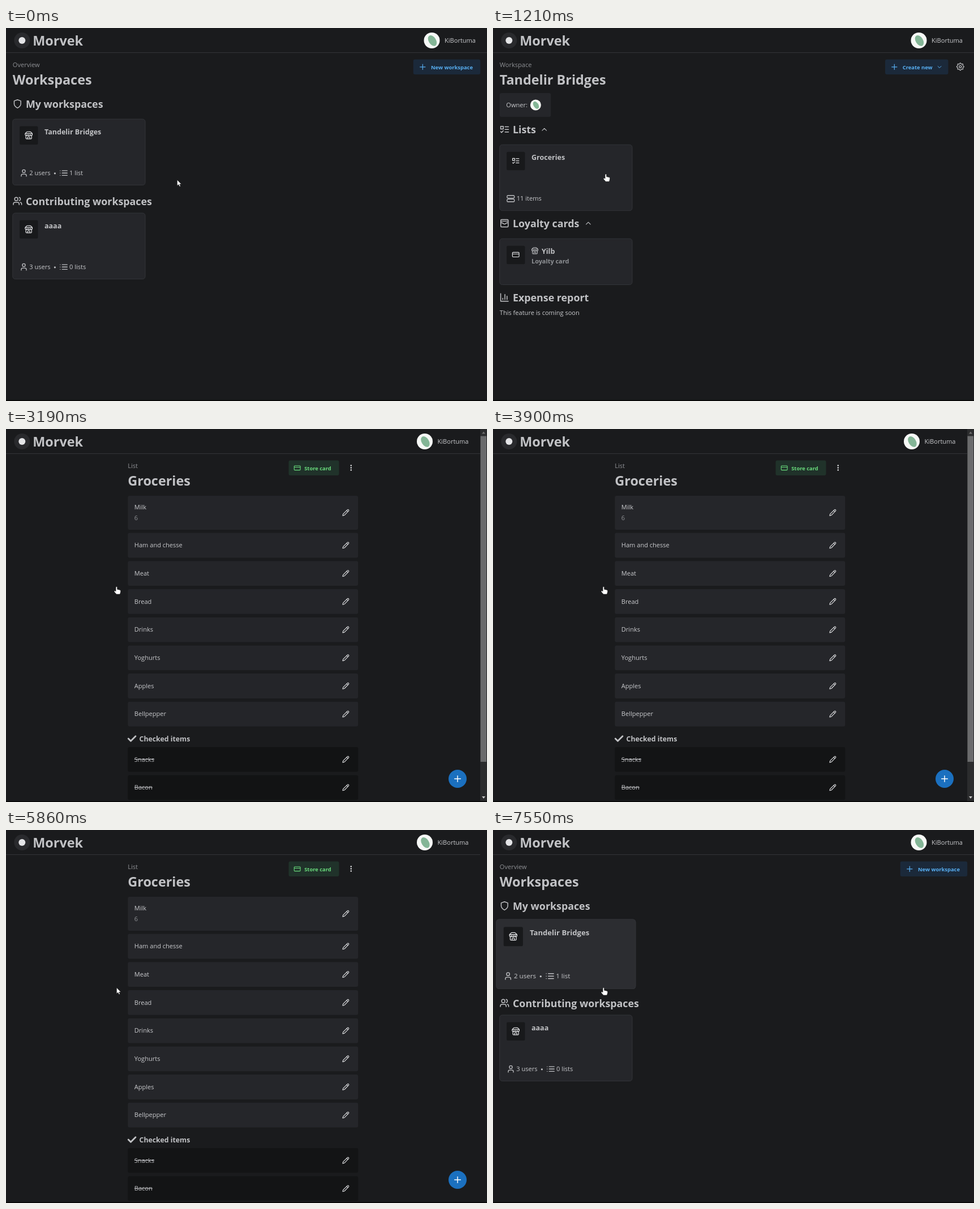
These frames come from a looping animation (850 by 659 pixels, 8 s). An HTML page:

```html
<!DOCTYPE html>
<html lang="en">
<head>
<meta charset="utf-8">
<title>Workspaces</title>
<style>
html, body { margin: 0; width: 100%; height: 100%; overflow: hidden; background: #1a1b1d; }
svg { display: block; width: 100vw; height: 100vh; }
text { font-family: "Open Sans", "Noto Sans", sans-serif; white-space: pre; }
</style>
</head>
<body>
<svg id="stage" viewBox="0 0 850 659" xmlns="http://www.w3.org/2000/svg"></svg>
<script>
const LOOP = 8000, FADE = 250;
const BG = '#1a1b1d', CARD = '#25262a', LIGHT = '#c1c2c5', BRIGHT = '#c9cacd', DIM = '#8f9195', WHITE = '#e4e5e7', BLUE = '#58b0f4', GREEN = '#69db7c';
const BODY = 11.06, HEAD = 17.84, TITLE = 23.4, SMALL = 12.5;

function gearPath() {
  let d = '';
  for (let i = 0; i < 96; i++) {
    const a = i / 96 * 2 * Math.PI, r = 8.4 + 1.2 * Math.tanh(2 * Math.cos(8 * a));
    d += (i ? 'L' : 'M') + (12 + r * Math.cos(a)).toFixed(2) + ' ' + (12 + r * Math.sin(a)).toFixed(2);
  }
  return d + 'ZM9 12a3 3 0 1 0 6 0a3 3 0 1 0-6 0';
}

const ICONS = {
  shield: 'M12 22s8-4 8-10V5l-8-3l-8 3v7c0 6 8 10 8 10',
  users: 'M5 7a4 4 0 1 0 8 0a4 4 0 1 0-8 0M2 21v-2a4 4 0 0 1 4-4h6a4 4 0 0 1 4 4v2M16 3.1a4 4 0 0 1 0 7.8M22 21v-2a4 4 0 0 0-3-3.9',
  user: 'M8 7a4 4 0 1 0 8 0a4 4 0 0 0-8 0M5 21v-2a4 4 0 0 1 4-4h6a4 4 0 0 1 4 4v2',
  list: 'M8 6h13M8 12h13M8 18h13M3 6v.01M3 12v.01M3 18v.01',
  store: 'M2 7l4.4-4.4a2 2 0 0 1 1.4-.6h8.4a2 2 0 0 1 1.4.6L22 7M4 12v8a2 2 0 0 0 2 2h12a2 2 0 0 0 2-2v-8M9 22v-4a2 2 0 0 1 2-2h2a2 2 0 0 1 2 2v4M2 7h20v3a2.5 2.5 0 0 1-5 0a2.5 2.5 0 0 1-5 0a2.5 2.5 0 0 1-5 0a2.5 2.5 0 0 1-5 0z',
  tasks: 'M3 5h6v6h-6zM3 17l2 2l4-4M13 6h8M13 12h8M13 18h8',
  stack: 'M2 6a2.5 2.5 0 0 1 2.5-2.5h15a2.5 2.5 0 0 1 2.5 2.5v2a2.5 2.5 0 0 1-2.5 2.5h-15a2.5 2.5 0 0 1-2.5-2.5zM2 16a2.5 2.5 0 0 1 2.5-2.5h15a2.5 2.5 0 0 1 2.5 2.5v2a2.5 2.5 0 0 1-2.5 2.5h-15a2.5 2.5 0 0 1-2.5-2.5z',
  wallet: 'M3 5a2 2 0 0 1 2-2h14a2 2 0 0 1 2 2v14a2 2 0 0 1-2 2h-14a2 2 0 0 1-2-2zM3 9a2 2 0 0 1 2-2h14a2 2 0 0 1 2 2M3 11h3c.8 0 1.6.3 2.1.9l1.1.9c1.6 1.6 4.1 1.6 5.7 0l1.1-.9c.5-.5 1.3-.9 2.1-.9h2.9',
  card: 'M2 7a2 2 0 0 1 2-2h16a2 2 0 0 1 2 2v10a2 2 0 0 1-2 2h-16a2 2 0 0 1-2-2zM2 10h20',
  chart: 'M3 3v18h18M8 17v-3M13 17v-12M18 17v-8',
  gear: gearPath(),
  pencil: 'M17 3a2.84 2.84 0 1 1 4 4L7.5 20.5L2 22l1.5-5.5zM15 5l4 4',
  plus: 'M12 4v16M4 12h16',
  up: 'M5 15l7-7l7 7',
  down: 'M5 9l7 7l7-7',
  check: 'M3 12l6 6l12-12'
};

const icon = (name, x, y, size, color = LIGHT, w = 2) =>
  `<path d="${ICONS[name]}" transform="translate(${x - size / 2} ${y - size / 2}) scale(${size / 24})" fill="none" stroke="${color}" stroke-width="${w}" stroke-linecap="round" stroke-linejoin="round"/>`;
const text = (x, y, str, size = BODY, color = BRIGHT, weight = 400, extra = '') =>
  `<text x="${x}" y="${y}" font-size="${size}" font-weight="${weight}" fill="${color}" ${extra}>${str}</text>`;
const bold = (x, y, str, size, color = LIGHT) => text(x, y, str, size, color, 700);
const rect = (x, y, w, h, fill, r = 0, extra = '') =>
  `<rect x="${x}" y="${y}" width="${w}" height="${h}" rx="${r}" fill="${fill}" ${extra}/>`;
const circle = (x, y, r, fill) => `<circle cx="${x}" cy="${y}" r="${r}" fill="${fill}"/>`;
const group = (id, inner) => `<g id="${id}">${inner}</g>`;

// Text that morphs between pages; base is the baseline's distance from the top of its box.
const boxes = {};
function shared(id, str, x, y, w, base, size, color = LIGHT, weight = 700) {
  boxes[id] = { x, y, w };
  return group(id, text(0, base, str, size, color, weight));
}
const eyebrow = (id, str, x, w) => shared(id, str, x, 56, w, 12.6, BODY, DIM, 400);
const title = (id, str, x, w) => shared(id, str, x, 75.8, w, 24.2, TITLE);
const heading = (id, str, y, w) => shared(id, str, 35, y - 18, w, 18, HEAD);
const cardTitle = (id, str, y, w) => shared(id, str, 68, y - 14, w, 14, SMALL);

const avatar = (x, y, r) => circle(x, y, r, '#f6f8f6') +
  `<ellipse cx="${x + r * .04}" cy="${y + r * .06}" rx="${r * .46}" ry="${r * .74}" transform="rotate(-32 ${x} ${y})" fill="#83b596"/>`;

const userBadge = x => avatar(x, 22, 14) + text(x + 22.5, 25.5, 'KiBortuma');

function card(id, y, h, inner) {
  const frame = (fill, line, extra = '') => rect(11.8, y, 234.2, h, fill, 4.5, `stroke="${line}" stroke-width="1" ${extra}`);
  return group(id, frame(CARD, '#323438') +
    frame('#2c2d31', '#313236', 'class="glow" opacity="0"') +
    rect(24, y + 12.5, 32.5, 32.5, '#18191b', 2.5) + inner);
}
const badge = (name, y, size) => icon(name, 40.2, y, size, WHITE);

const counts = (y, users, lists) => icon('user', 31.5, y - 3.8, 15.5) + text(41.3, y, users) +
  circle(86.4, y - 3.2, 1.6, LIGHT) + icon('list', 102, y - 3.7, 16.5) + text(112, y, lists);

const button = (x, w, fill, label, tx, color) => rect(x, 55.5, w, 26.5, fill, 3) + bold(tx, 72.5, label, 9.4, color);

function overviewPage() {
  return eyebrow('overLabel', 'Overview', 11.8, 139) + title('overTitle', 'Workspaces', 11.8, 139) +
    button(719.7, 118.5, '#1b293a', 'New workspace', 751, BLUE) + icon('plus', 736.3, 68.8, 14, BLUE) +
    icon('shield', 20.3, 134, 17.5) + heading('overHead', 'My workspaces', 141, 137) +
    card('overCard', 161, 116.5, badge('store', 189.5, 15) + counts(260, '2 users', '1 list')) +
    cardTitle('overName', 'Tandelir Bridges', 187.5, 102) +
    icon('users', 20.3, 305.8, 17.5) + bold(35, 312.6, 'Contributing workspaces', HEAD) +
    card('otherCard', 327, 116.5, badge('store', 355.5, 15) + counts(426, '3 users', '0 lists') +
      bold(68, 353.6, 'aaaa', SMALL));
}

function workPage() {
  return eyebrow('workLabel', 'Workspace', 11.8, 193) + title('workTitle', 'Tandelir Bridges', 11.8, 193) +
    button(693, 111.5, '#1b293a', 'Create new', 723.7, BLUE) + icon('plus', 709.3, 68.8, 14, BLUE) +
    icon('down', 789, 68.8, 10, BLUE, 2.4) + icon('gear', 825.8, 68.3, 16, LIGHT, 1.8) +
    rect(11.8, 115, 90.5, 42, CARD, 3) + text(23.3, 140.2, 'Owner:') + avatar(75.4, 136, 9.5) +
    icon('tasks', 20.5, 179.2, 18.5) + heading('workHead', 'Lists', 186.3, 40) + icon('up', 90.7, 179.6, 13) +
    card('workCard', 206.2, 116.5, badge('tasks', 234.7, 15) + icon('stack', 31.3, 301.5, 15.5) +
      text(41.8, 305.2, '11 items')) +
    cardTitle('workName', 'Groceries', 232.6, 59) +
    icon('wallet', 20.3, 345, 17.5) + bold(35, 352.2, 'Loyalty cards', HEAD) + icon('up', 168.4, 345.3, 13) +
    card('loyalty', 372.2, 81.3, badge('card', 400.4, 14) + icon('store', 74, 393.5, 13) +
      bold(86, 398.6, 'Yilb', SMALL) + bold(68, 416.2, 'Loyalty card', 10.9, DIM)) +
    icon('chart', 20.3, 476, 18) + bold(35, 483.2, 'Expense report', HEAD) +
    text(11.8, 507.2, 'This feature is coming soon');
}

function listPage() {
  const pencil = y => icon('pencil', 600.4, y, 13, WHITE);
  const names = ['Ham and chesse', 'Meat', 'Bread', 'Drinks', 'Yoghurts', 'Apples', 'Bellpepper'];
  let rows = rect(215.3, 118, 407, 60, CARD, 3) + text(226.8, 142.4, 'Milk') +
    text(226.8, 160.5, '6', BODY, DIM) + pencil(147.7);
  names.forEach((name, i) => {
    const y = 183.6 + 49.7 * i;
    rows += rect(215.3, y, 407, 43.8, CARD, 3) + text(226.8, y + 25.5, name) + pencil(y + 21.8);
  });
  rows += icon('check', 222.6, 547, 17, LIGHT, 4) + bold(235.6, 551.6, 'Checked items', 12.3);
  ['Snacks', 'Bacon'].forEach((name, i) => {
    const y = 562 + 49.7 * i;
    rows += rect(215.3, y, 407, 43.6, '#131415', 3) +
      text(226.8, y + 25.5, name, BODY, '#b9babd', 400, 'text-decoration="line-through"') + pencil(y + 21.7);
  });
  return eyebrow('listLabel', 'List', 215.3, 110) + title('listTitle', 'Groceries', 215.3, 110) +
    button(499.5, 89, '#20322a', 'Store card', 527.2, GREEN) + icon('card', 514.7, 68.8, 13, GREEN) +
    [64.4, 68.4, 72.4].map(y => circle(609.8, y, 1.25, WHITE)).join('') +
    group('rows', rows) + circle(798, 618, 16, '#1b70bf') + icon('plus', 798, 618, 16, '#fff', 2.2);
}

const scrollbar = rect(838, 0, 12, 658, '#2b2c2d') + rect(838.5, 12.5, 10.5, 575.5, '#6a6b6c') +
  '<path d="M841 8.5l3-4l3 4z" fill="#6d6d6d"/><path d="M841 649l3 4l3-4z" fill="#c8c8c8"/>';
const hand = '<path d="M-1.4 1.3a1.35 1.35 0 0 1 2.7 0V4.6L5.8 5.6Q7.6 6.1 7.4 7.9L6.8 11.2L5.9 13.4H-.3L-4.2 8.9Q-4.7 7.2-3.1 6.9L-1.4 8.1Z" fill="#fff" stroke="#111" stroke-width=".7"/>';
const arrow = '<path d="M0 0V10.6L2.5 8.4L4.3 12L6.1 11.2L4.4 7.7H7.7Z" fill="#fff" stroke="#111" stroke-width=".6"/>';

document.getElementById('stage').innerHTML =
  rect(0, 0, 850, 659, BG) + rect(0, 43, 850, 1, '#333539') +
  circle(28.3, 22, 14, '#292a2d') + circle(28.3, 22, 6, WHITE) + bold(47.3, 31, 'Morvek', TITLE) +
  group('wideUser', userBadge(752.5)) +
  group('slimUser', rect(838, 0, 12, 657, BG) + userBadge(740)) +
  group('over', overviewPage()) + group('work', workPage()) + group('list', listPage()) +
  group('scroll', scrollbar) + rect(0, 657.4, 850, 1.6, '#060606') +
  group('cursor', group('hand', hand) + group('arrow', arrow));

const el = {};
document.querySelectorAll('[id]').forEach(e => el[e.id] = e);

const clamp = x => Math.min(1, Math.max(0, x));
const mix = (a, b, p) => a + (b - a) * p;
const bezier = (a, b, u) => 3 * u * (1 - u) * (1 - u) * a + 3 * u * u * (1 - u) * b + u * u * u;
function ease(x) {
  if (x <= 0 || x >= 1) return clamp(x);
  let lo = 0, hi = 1;
  for (let i = 0; i < 24; i++) {
    const m = (lo + hi) / 2;
    if (bezier(.25, .25, m) < x) lo = m; else hi = m;
  }
  return bezier(.1, 1, lo);
}
const ramp = (t, from, to) => ease((t - from) / (to - from));
const fade = (id, v) => el[id].setAttribute('opacity', v);
const show = (id, on) => el[id].setAttribute('visibility', on ? 'visible' : 'hidden');

const visits = [[0, 'over'], [885, 'work'], [2510, 'list'], [5935, 'work'], [7080, 'over']];
const links = [
  ['over', 'work', [['overName', 'workTitle'], ['overHead', 'workLabel']]],
  ['work', 'list', [['workName', 'listTitle'], ['workHead', 'listLabel']]]
];

function place(id, box) {
  el[id].setAttribute('transform', `translate(${box.x} ${box.y}) scale(${box.w / boxes[id].w})`);
}

// Grows a card around its centre and returns the box of its title.
function hover(cardId, nameId, cy, h) {
  const cx = 129, s = 1 + .05 * h, b = boxes[nameId];
  el[cardId].setAttribute('transform', `translate(${cx} ${cy}) scale(${s}) translate(${-cx} ${-cy})`);
  el[cardId].querySelector('.glow').setAttribute('opacity', h);
  return { x: cx + (b.x - cx) * s, y: cy + (b.y - cy) * s, w: b.w * s };
}

function drawCursor(t) {
  const m = ramp(t, 60, 250), d = ramp(t, 1980, 2230);
  const isArrow = t < 125 || (t >= 4580 && t < 6910);
  let x = mix(302.4, 199.4, m), y = mix(268.2, 258, m);
  if (t > 1000) { x = mix(199.4, 195.4, d); y = mix(258, 278.6, d); }
  show('arrow', isArrow);
  show('hand', !isArrow);
  el.cursor.setAttribute('transform', `translate(${x} ${y})`);
}

function render(t) {
  let i = visits.length - 1;
  while (t < visits[i][0]) i--;
  const [at, page] = visits[i];
  const last = i ? visits[i - 1][1] : page;
  const p = i ? ease((t - at) / FADE) : 1;
  const weight = { over: 0, work: 0, list: 0 };
  weight[last] = 1 - p;
  weight[page] = p;
  for (const id in weight) fade(id, weight[id]);
  fade('slimUser', weight.list);
  fade('wideUser', 1 - weight.list);

  const early = t < 4000;
  const now = Object.assign({}, boxes);
  now.overName = hover('overCard', 'overName', 219.2, early ? ramp(t, 110, 310) : ramp(t, 7330, 7545));
  now.workName = hover('workCard', 'workName', 264.4, early ? ramp(t, 1275, 1440) : ramp(t, 6180, 6340));
  if (p < 1) for (const [a, b, pairs] of links) {
    const back = last === b && page === a;
    if (!back && !(last === a && page === b)) continue;
    const q = back ? 1 - p : p;
    for (const [m, n] of pairs) {
      const from = now[m], to = now[n];
      now[m] = now[n] = { x: mix(from.x, to.x, q), y: mix(from.y, to.y, q), w: mix(from.w, to.w, q) };
    }
  }
  for (const id in now) place(id, now[id]);

  fade('rows', ramp(t, 2800, 3240));
  show('scroll', t >= 2480 && t < 5860);
  drawCursor(t);
}

const start = performance.now();
function tick() {
  render((performance.now() - start) % LOOP);
  requestAnimationFrame(tick);
}
render(0);
requestAnimationFrame(tick);
</script>
</body>
</html>
```
